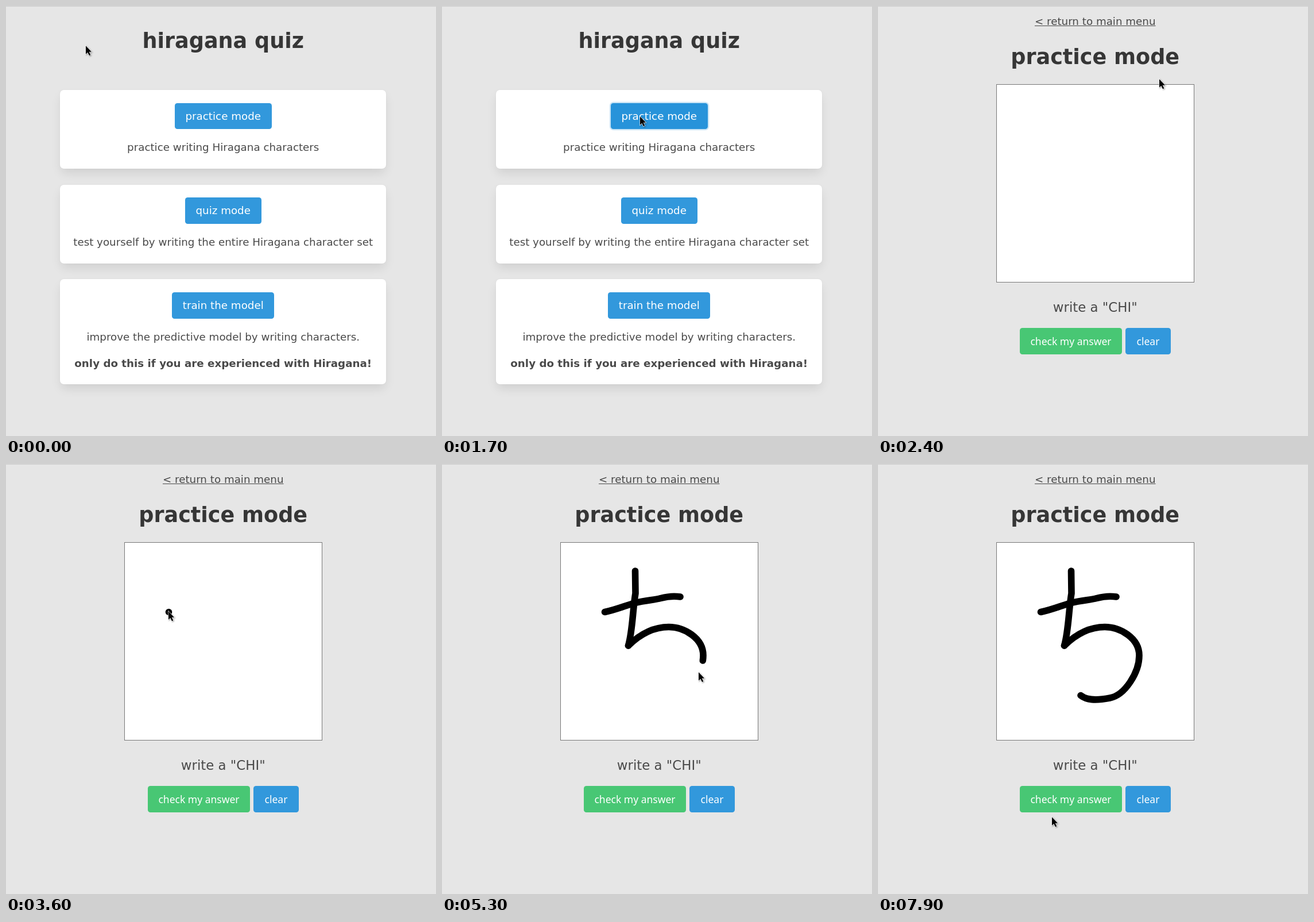
An HTML page that plays this animation: 749x748 px, repeating every 8 s.

```html
<!DOCTYPE html>
<html lang="en">
<head>
<meta charset="utf-8">
<title>hiragana quiz</title>
<style>
html, body { margin: 0; width: 100%; height: 100%; overflow: hidden; background: #e6e6e6; }
body { position: relative; font: 18.28px/27px "DejaVu Sans", sans-serif; color: #4a4a4a; }
body::before { content: ""; position: absolute; left: 0; top: 0; width: 100%; height: 1px; background: #cdcdcd; }
.page { position: absolute; left: 0; top: 0; width: 756.5px; height: 748px; text-align: center; white-space: nowrap; }
.page > * { position: absolute; box-sizing: border-box; }
h1, p { margin: 0; width: 100%; }
h1 { font-size: 36.56px; line-height: 43px; color: #363636; }
.task { font-size: 22.85px; line-height: 26px; }
.card {
  left: 94.25px; top: calc(146px + 164.7px * var(--row)); width: 568px; padding: 22.8px 0 23.6px;
  background: #fff; border-radius: 6.9px;
  box-shadow: 0 9.2px 18.4px -2.3px rgba(10,10,10,.1), 0 0 0 1px rgba(10,10,10,.02);
}
.card p { margin-top: 18px; }
.card p + p { margin-top: 19px; }
.btn {
  width: max-content; height: 45.6px; margin: 0 auto; padding: 0 18.7px; line-height: 46px;
  border-radius: 4.6px; background: #3298dc; color: #fff;
}
.btn.hover { background: #2793da; }
.btn.focus { box-shadow: 0 0 0 2.3px rgba(50,152,220,.25); }
.btn.plain { top: 560.4px; padding: 0; font: 17.5px/46px "Noto Sans", "Open Sans", sans-serif; }
.btn.ok { background: #48c774; }
.btn.ok.hover { background: #3ec46d; }
.pad { left: 206px; top: 136px; width: 345px; height: 345px; background: #fff; border: 1px solid #777; }
svg { position: absolute; left: 0; top: 0; }
.ink { fill: none; stroke: #000; stroke-width: 11.6; stroke-linecap: round; stroke-linejoin: round; }
#cursor { filter: drop-shadow(1px 1px .8px rgba(0,0,0,.4)); }
</style>
</head>
<body>
<div class="page" id="menu">
  <h1 style="top:39px">hiragana quiz</h1>
  <div class="card" style="--row:0">
    <div class="btn" id="start">practice mode</div>
    <p>practice writing Hiragana characters</p>
  </div>
  <div class="card" style="--row:1">
    <div class="btn">quiz mode</div>
    <p>test yourself by writing the entire Hiragana character set</p>
  </div>
  <div class="card" style="--row:2">
    <div class="btn">train the model</div>
    <p>improve the predictive model by writing characters.</p>
    <p><b>only do this if you are experienced with Hiragana!</b></p>
  </div>
</div>

<div class="page" id="practice" hidden>
  <p style="top:13px"><u>&lt; return to main menu</u></p>
  <h1 style="top:67px">practice mode</h1>
  <div class="pad"></div>
  <p class="task" style="top:511px">write a "CHI"</p>
  <div class="btn plain ok" id="check" style="left:247px;width:178px">check my answer</div>
  <div class="btn plain" style="left:431px;width:79px">clear</div>
</div>

<svg width="749" height="748" viewBox="0 0 749 748">
  <path class="ink" id="bar" d="M283.5 257.5C305 253 320 246 337 241.5S370 236.5 381 233.5 402 229 415 231"/>
  <path class="ink" id="stem" d="M336.5 186 337 225C332 255 332 290 324.5 316"/>
  <path class="ink" id="bowl" d="M324.5 316C345 296 368 283.5 395 283.5S455 303 455 333 430 402 404 407 363 410.5 353 402.5"/>
  <g id="cursor">
    <path d="M0 .3V14.8L3.3 11.8 6 17.3 8.3 16.2 5.7 10.8H10Z" stroke="#fff" stroke-opacity=".85" stroke-width="1.4" paint-order="stroke"/>
  </g>
</svg>

<script>
const LOOP = 8000, STEP = 100, PRESS = 1600, OPEN = 1800;
const $ = id => document.getElementById(id);
const home = { x: 139, y: 69 };

// The pointer either travels to a point or draws along a stroke.
const travel = (at, end, x, y) => ({ at, end, to: { x, y } });
const write = (at, end, id) => ({ at, end, path: $(id), length: $(id).getTotalLength() });
const actions = [
  travel(100, 1200, 345, 192),
  travel(2000, 2400, 490, 127),
  travel(2900, 3000, 535, 111),
  travel(3500, 3600, 283, 255),
  write(3600, 4100, "bar"),
  travel(4300, 4400, 336, 185),
  write(4400, 4700, "stem"),
  write(4800, 5600, "bowl"),
  travel(6400, 6500, 330, 553),
  travel(7700, 7900, 303, 614)
];

const ease = u => u * u * (3 - 2 * u);
const mix = (a, b, u) => a + (b - a) * u;

// Ink speeds up along the stroke; the pointer runs a little ahead of it.
function drawInk({ path, length }, u) {
  const inked = length * u ** 1.25;
  path.style.strokeDasharray = `${inked} 999`;
  const tip = path.getPointAtLength(inked + 25 * Math.sin(Math.PI * u));
  return { x: tip.x - 1, y: tip.y - 2 };
}

function draw(t) {
  let pos = home;
  for (const a of actions) {
    const started = t >= a.at;
    const u = Math.min(1, (t - a.at) / (a.end - a.at));
    if (a.path) a.path.style.display = started ? "" : "none";
    if (!started) continue;
    pos = a.path ? drawInk(a, u)
      : { x: mix(pos.x, a.to.x, ease(u)), y: mix(pos.y, a.to.y, ease(u)) };
  }
  const { x, y } = pos;
  $("cursor").setAttribute("transform", `translate(${Math.round(x)} ${Math.round(y)})`);
  $("menu").hidden = t >= OPEN;
  $("practice").hidden = t < OPEN;
  $("start").classList.toggle("hover", x >= 294 && y >= 169);
  $("start").classList.toggle("focus", t >= PRESS);
  $("check").classList.toggle("hover", y >= 560 && y < 606);
}

const begin = performance.now();
function tick() {
  const t = (performance.now() - begin) % LOOP;
  draw(Math.floor(t / STEP) * STEP);
  requestAnimationFrame(tick);
}
tick();
</script>
</body>
</html>
```
